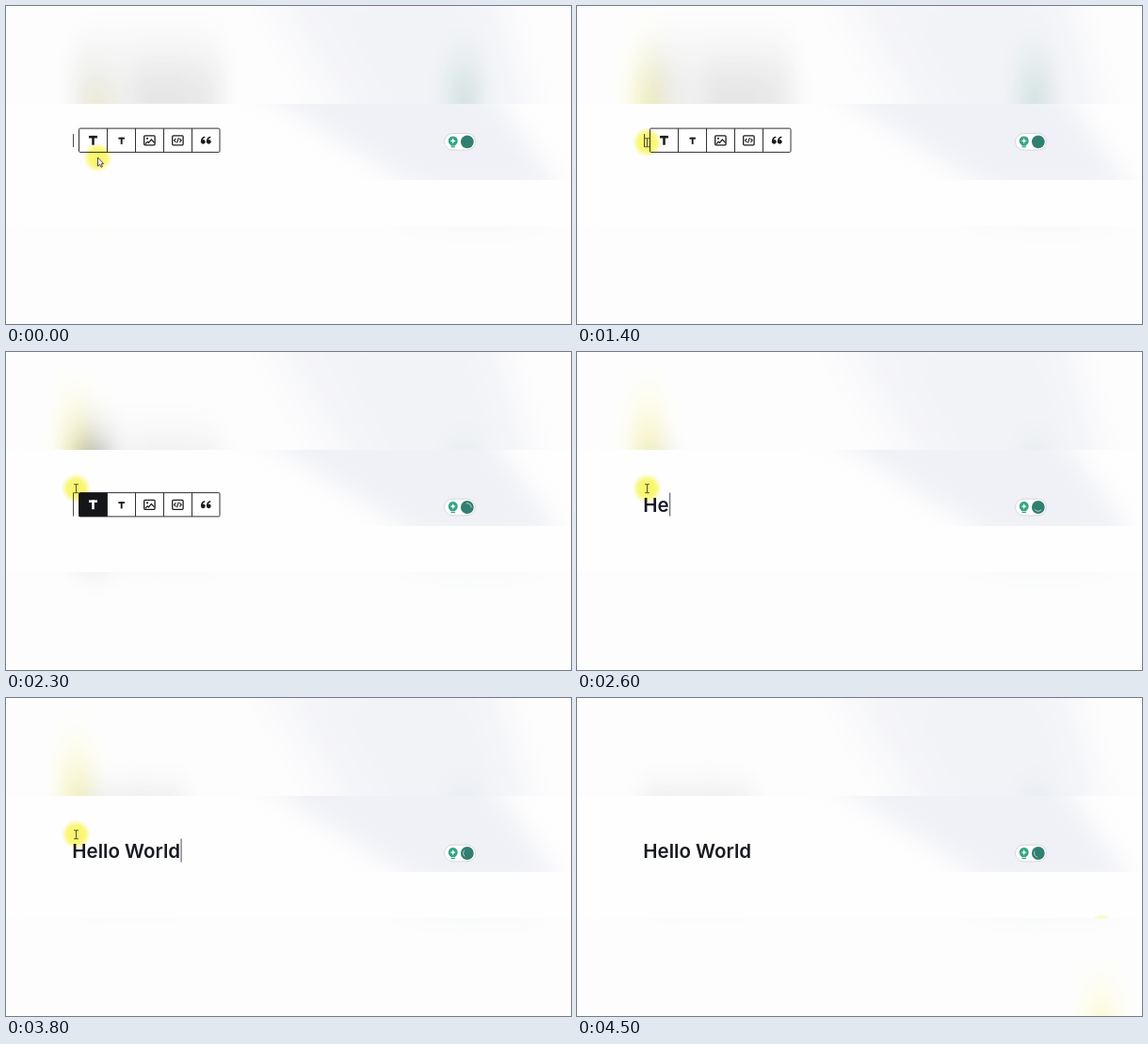
An HTML page with a canvas for the animation above (4.6 s loop, 600 by 338 pixels).

```html
<!DOCTYPE html>
<html lang="en">
<head>
<meta charset="utf-8">
<title>Editor heading</title>
<style>
  html, body { margin: 0; width: 100%; height: 100%; overflow: hidden; background: #fdfdfd; }
  canvas { display: block; width: 600px; height: 338px; }
</style>
</head>
<body>
<canvas id="stage" width="600" height="338"></canvas>
<script>
const W = 600, H = 338, LOOP = 4600, STEP = 100;
const BAND_TOP = 104, BAND_HEIGHT = 130;
const INK = '#1b1c1f';
const HEADING = 'Hello World';
const HEADING_FONT = '600 20.5px Inter, sans-serif';
const KEY_TIMES = [2500, 2600, 2700, 2800, 3000, 3100, 3300, 3400, 3500, 3700, 3800];
const SHIFT_TIME = 2200, TEXT_X = 71;

const out = document.getElementById('stage').getContext('2d');
const makeLayer = () => {
  const canvas = document.createElement('canvas');
  canvas.width = W;
  canvas.height = H;
  return canvas.getContext('2d');
};
const page = makeLayer(), soft = makeLayer(), tint = makeLayer();

const within = (t, from, to) => t >= from && t < to;
const mix = (a, b, p) => a + (b - a) * p;
const ease = p => p * p * (3 - 2 * p);

function polygon(c, points) {
  c.beginPath();
  points.forEach(([x, y]) => c.lineTo(x, y));
  c.closePath();
}

function stroke(c, points, width, color) {
  c.beginPath();
  points.forEach(([x, y]) => c.lineTo(x, y));
  c.lineWidth = width;
  c.strokeStyle = color;
  c.stroke();
}

function disc(c, x, y, r, color) {
  c.beginPath();
  c.arc(x, y, r, 0, Math.PI * 2);
  c.fillStyle = color;
  c.fill();
}

// Pale diagonal shade behind the editor, cut off at its lower edge.
function prepareTint() {
  tint.beginPath();
  tint.rect(0, 0, W, 185);
  tint.clip();
  tint.filter = 'blur(13px)';
  tint.fillStyle = 'rgba(222, 225, 236, 0.42)';
  polygon(tint, [[245, 75], [505, 75], [592, 200], [445, 200]]);
  tint.fill();
}

function letterT(c, x, y, size, color) {
  const bar = size * 0.26;
  c.fillStyle = color;
  c.fillRect(x - size * 0.46, y - size / 2, size * 0.92, bar);
  c.fillRect(x - bar / 2, y - size / 2, bar, size);
}

function frameIcon(c, x, y) {
  c.beginPath();
  c.roundRect(x - 5.7, y - 5, 11.4, 10, 1);
  c.lineWidth = 1.3;
  c.strokeStyle = INK;
  c.stroke();
}

function imageIcon(c, x, y) {
  frameIcon(c, x, y);
  disc(c, x - 2.4, y - 2, 1.1, INK);
  stroke(c, [[x - 4.6, y + 4], [x - 2.2, y + 1.5], [x - 1, y + 2.5], [x + 2, y - 0.8], [x + 5.2, y + 2.6]], 1.2, INK);
}

function codeIcon(c, x, y) {
  frameIcon(c, x, y);
  for (const side of [-1, 1]) {
    stroke(c, [[x + side * 2, y - 2], [x + side * 3.8, y], [x + side * 2, y + 2]], 1.1, INK);
  }
  stroke(c, [[x + 0.9, y - 2.8], [x - 0.9, y + 2.8]], 1.1, INK);
}

function quoteIcon(c, x, y) {
  for (const dx of [-2.7, 3.3]) {
    disc(c, x + dx, y + 1.5, 2.4, INK);
    c.beginPath();
    c.moveTo(x + dx - 1.6, y + 1.7);
    c.quadraticCurveTo(x + dx - 1.9, y - 2.6, x + dx + 2, y - 3.6);
    c.lineWidth = 1.6;
    c.strokeStyle = INK;
    c.stroke();
  }
}

function drawToolbar(c, top, active) {
  const y = top + 12.7;
  c.beginPath();
  c.roundRect(77.5, top, 149.5, 25.3, 1.2);
  c.fillStyle = '#fff';
  c.fill();
  c.lineWidth = 1;
  c.strokeStyle = '#303134';
  c.stroke();
  if (active) {
    c.fillStyle = '#151619';
    c.fillRect(77.5, top, 30, 25.3);
  }
  for (let x = 107.5; x < 220; x += 30) stroke(c, [[x, top], [x, top + 25.3]], 1, '#303134');
  letterT(c, 92.5, y, 9.8, active ? '#fff' : INK);
  letterT(c, 122.7, y + 0.5, 7.2, INK);
  imageIcon(c, 152.4, y);
  codeIcon(c, 182.4, y);
  quoteIcon(c, 212, y);
}

function drawBulb(c, x, y) {
  const green = '#35a583';
  disc(c, x, y - 0.9, 5, green);
  c.fillStyle = green;
  c.fillRect(x - 2.5, y + 2.5, 5, 1.7);
  c.fillRect(x - 2.2, y + 4.9, 4.4, 1.2);
  c.fillStyle = '#fff';
  polygon(c, [[x, y - 4], [x + 0.9, y - 1.8], [x + 3, y - 0.9], [x + 0.9, y], [x, y + 2.2],
    [x - 0.9, y], [x - 3, y - 0.9], [x - 0.9, y - 1.8]]);
  c.fill();
}

function spinnerAngle(t) {
  if (within(t, 1900, 2700)) return (t - 2300) * 0.48 - 50;
  if (t >= 3400) return (t - 3800) * 0.48 + 180;
  return null;
}

function drawWidget(c, y, t) {
  c.beginPath();
  c.roundRect(465.5, y - 8.8, 33, 17.6, 8.8);
  c.fillStyle = '#fff';
  c.fill();
  c.lineWidth = 1;
  c.strokeStyle = '#d6d9dd';
  c.stroke();
  drawBulb(c, 474.7, y);
  disc(c, 489.8, y, 6.9, '#317f70');
  const angle = spinnerAngle(t);
  if (angle === null) return;
  const a = angle * Math.PI / 180;
  c.beginPath();
  c.arc(489.8, y, 4.2, a - 0.95, a + 0.95);
  c.lineWidth = 1;
  c.strokeStyle = '#b9d8d0';
  c.stroke();
}

function pointerAt(t) {
  if (t < 500) {
    const p = ease(t / 500);
    return { x: mix(97.5, 74.5, p), y: mix(161, 145, p), arrow: t < 400 };
  }
  if (t <= 3800) return { x: 74.5, y: 145, arrow: false };
  if (t <= 4200) {
    const p = ease((t - 3800) / 400);
    return { x: mix(74.5, 542.5, p), y: mix(145, 192.5, p), arrow: true };
  }
  const p = Math.min(1, (t - 4200) / 200);
  return { x: mix(542.5, 557, p), y: mix(192.5, 245.5, p), arrow: true };
}

function drawPointer(c, { x, y, arrow }) {
  const glow = c.createRadialGradient(x, y, 0, x, y, 16);
  glow.addColorStop(0, 'rgba(250, 246, 105, 1)');
  glow.addColorStop(0.6, 'rgba(251, 247, 115, 0.95)');
  glow.addColorStop(0.82, 'rgba(252, 249, 140, 0.5)');
  glow.addColorStop(1, 'rgba(253, 251, 170, 0)');
  c.globalCompositeOperation = 'multiply';
  disc(c, x, y, 16, glow);
  c.globalCompositeOperation = 'source-over';

  if (arrow) {
    polygon(c, [[x, y], [x, y + 9.2], [x + 2.1, y + 7.3], [x + 3.5, y + 10.3],
      [x + 4.9, y + 9.7], [x + 3.6, y + 6.8], [x + 6.2, y + 6.6]]);
    c.fillStyle = '#fff';
    c.fill();
    c.lineWidth = 0.9;
    c.strokeStyle = '#3a3a3c';
    c.stroke();
  } else {
    stroke(c, [[x, y - 4], [x, y + 4.5]], 1, '#55533a');
    for (const dy of [-4.3, 4.7]) stroke(c, [[x - 2.4, y + dy], [x + 2.4, y + dy]], 1, '#55533a');
  }
}

function caretVisible(t) {
  return !within(t, 700, 1200) && !within(t, 1700, SHIFT_TIME) && t < 4500;
}

function drawEditor(c, t) {
  const shifted = t >= SHIFT_TIME;
  const text = HEADING.slice(0, KEY_TIMES.filter(k => k <= t).length);
  if (text) {
    c.font = HEADING_FONT;
    c.fillStyle = '#171a22';
    c.fillText(text, TEXT_X - 0.7, 169.5);
  } else {
    drawToolbar(c, shifted ? 149.6 : 130.1, t >= 1700);
  }
  if (caretVisible(t)) {
    const x = text ? TEXT_X - 0.2 + c.measureText(text).width : TEXT_X;
    c.fillStyle = '#4b4c50';
    if (shifted) c.fillRect(x, 149.5, 1, 25);
    else c.fillRect(x, 136, 1, 14);
  }
  drawWidget(c, shifted ? 165 : 144.3, t);
}

function render(t) {
  page.fillStyle = '#fefefe';
  page.fillRect(0, 0, W, H);
  page.drawImage(tint.canvas, 0, 0);
  drawEditor(page, t);
  drawPointer(page, pointerAt(t));

  soft.filter = 'none';
  soft.fillStyle = '#fdfdfd';
  soft.fillRect(0, 0, W, H);
  soft.filter = 'blur(13px)';
  soft.drawImage(page.canvas, 0, 0);

  // The blurred band fills the stage; the sharp band sits on top.
  out.drawImage(soft.canvas, 0, BAND_TOP, W, BAND_HEIGHT, 0, 0, W, H);
  out.fillStyle = 'rgba(249, 249, 250, 0.2)';
  out.fillRect(0, 0, W, H);
  out.drawImage(page.canvas, 0, BAND_TOP, W, BAND_HEIGHT, 0, BAND_TOP, W, BAND_HEIGHT);
}

const start = performance.now();
function tick() {
  const t = (performance.now() - start) % LOOP;
  render(Math.floor(t / STEP) * STEP);
  requestAnimationFrame(tick);
}

prepareTint();
tick();
</script>
</body>
</html>
```
